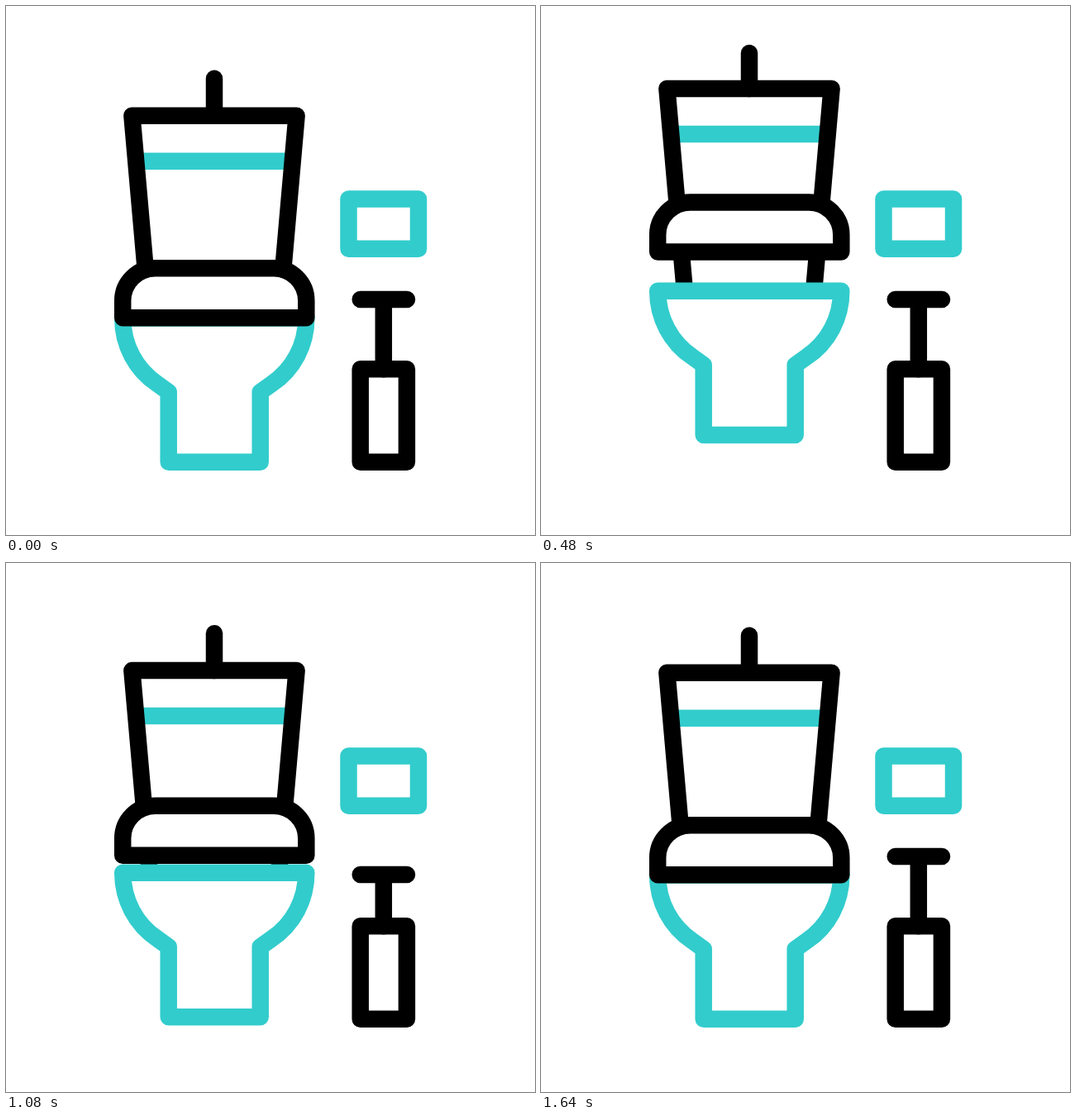
Write an HTML page that moves like this. It is 640 by 640 pixels and loops after 1800 ms.

```html
<!DOCTYPE html>
<html lang="en">
<head>
<meta charset="utf-8">
<title>Bouncing toilet icon</title>
<style>
  html, body { margin: 0; width: 100%; height: 100%; overflow: hidden; background: #fff; }
  svg { display: block; width: 100vw; height: 100vh; }
  path { fill: none; stroke: #000; stroke-width: 20.5; stroke-linecap: round; stroke-linejoin: round; }
  .aqua { stroke: #32cccc; }
  .butt { stroke-linecap: butt; }
  #lid { fill: #fff; }
</style>
</head>
<body>
<svg viewBox="0 0 640 640">
  <g id="body">
    <path class="aqua butt" d="M160 187.7H345"/>
    <path class="butt" d="M173.4 372L152.4 132.7H351.6L330.6 372"/>
    <path id="button"/>
    <path class="aqua" d="M141.2 377.5C141.2 410 157 440 183.5 457.5L196.7 467V551.8H307.7V467L321 457.5C347.5 440 363.3 410 363.3 377.5Z"/>
    <path id="lid" d="M141.2 377.2V356.5A39.3 39.3 0 0 1 180.5 317.2H324A39.3 39.3 0 0 1 363.3 356.5V377.2Z"/>
  </g>
  <path class="aqua" d="M414.5 233.5H499V293.8H414.5Z"/>
  <path id="brush"/>
  <path d="M428.7 439.3H484.9V551.8H428.7Z"/>
</svg>
<script>
const LOOP = 1800, STEP = 40;
const el = id => document.getElementById(id);
const body = el('body'), lid = el('lid'), button = el('button'), brush = el('brush');

// Rise to the first height, then fall and rebound with equal half-bounces.
function bounce(t, start, peak, half, heights) {
  if (t <= start) return 0;
  if (t < peak) return heights[0] * (1 - ((peak - t) / (peak - start)) ** 2);
  const k = Math.floor((t - peak + half) / (2 * half));
  const x = (t - peak) / half - 2 * k;
  return (heights[k] || 0) * (1 - x * x);
}

function smooth(t, from, to) {
  const p = Math.min(1, Math.max(0, (t - from) / (to - from)));
  return p * p * (3 - 2 * p);
}

function draw(t) {
  const jump = bounce(t, 45, 468, 137, [33, 16.5, 3.4]);
  const open = bounce(t, 203, 562, 215, [49.6, 25, 9.6]);
  const press = 17.5 * (smooth(t, 60, 295) - smooth(t, 295, 530));
  const push = 28 * (smooth(t, 800, 1200) - smooth(t, 1260, 1640));
  body.setAttribute('transform', `translate(0 ${-jump})`);
  lid.setAttribute('transform', `translate(0 ${-open})`);
  button.setAttribute('d', `M252 ${87.8 + press}V132.7`);
  brush.setAttribute('d', `M428.7 ${355 + push}H485M456.8 ${355 + push}V439.3`);
}

const begin = performance.now();
function tick() {
  const t = (performance.now() - begin) % LOOP;
  draw(Math.floor(t / STEP) * STEP);
  requestAnimationFrame(tick);
}
tick();
</script>
</body>
</html>
```
